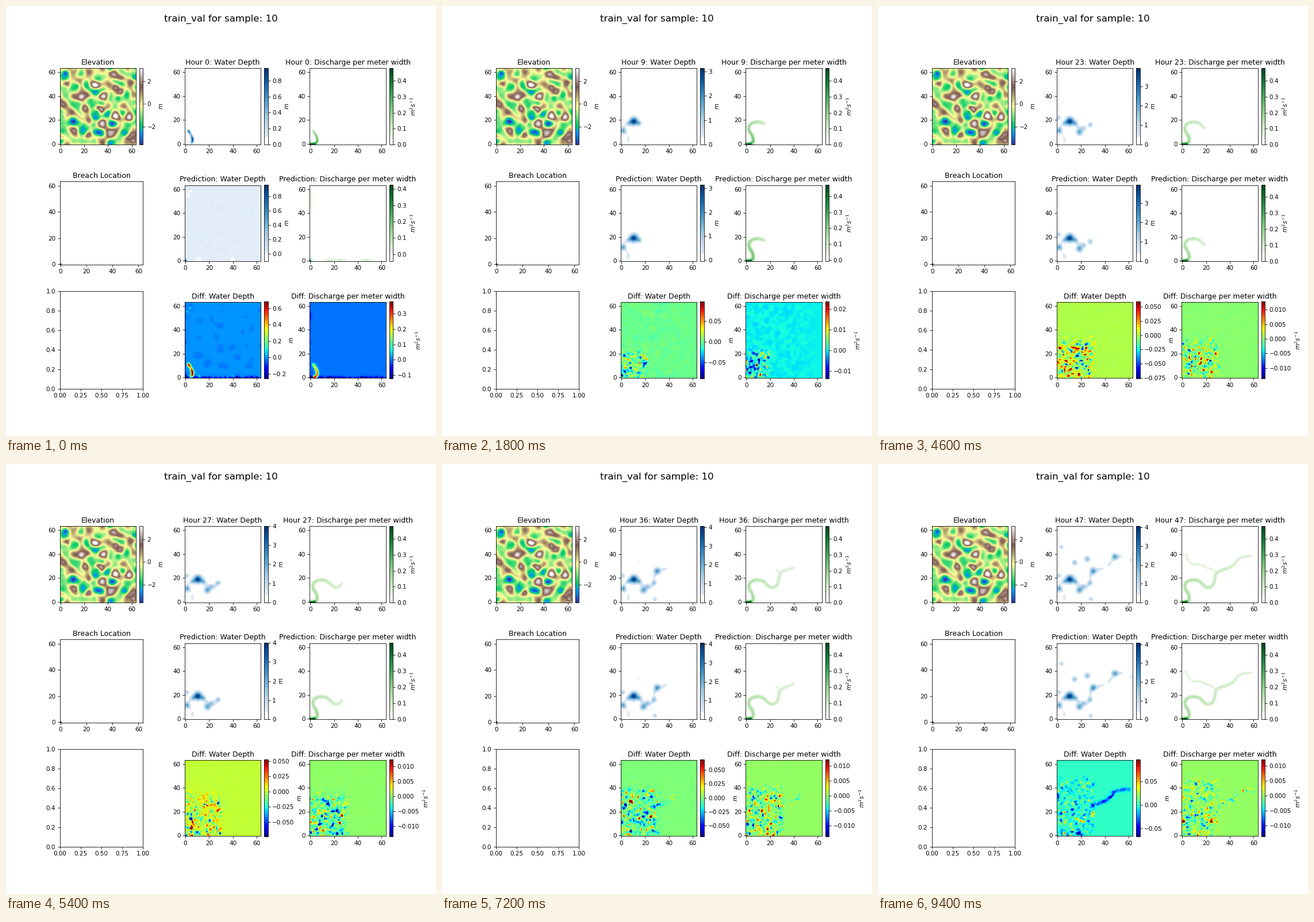
A matplotlib script that plays this animation: 748 by 748 pixels, repeating every 9600 ms.

```python
import numpy as np
import matplotlib.pyplot as plt
from matplotlib.animation import FuncAnimation
from matplotlib.colors import ListedColormap

N = 64
HOURS = 48
Y, X = np.mgrid[0:N, 0:N].astype(float)
FREQ = np.hypot(np.fft.fftfreq(N)[:, None], np.fft.fftfreq(N)[None, :])

# Hollows that fill with water: first wet hour, x, y, radius
POOLS = [
    (0, 1, 11, 2.2), (2, 10.5, 19, 3), (3, 6, 17, 1.7), (3, 15, 17.3, 1.8),
    (7, 1, 22, 1.8), (11, 18.5, 10, 2.4), (12, 22, 13, 1.8),
    (13, 27.5, 16, 1.9), (27, 28, 2.5, 1.7), (28, 30, 26, 2.4),
    (34, 14.5, 33, 2), (36, 25, 36, 2.1), (37, 48, 38, 2.3),
    (40, 3.5, 46, 1.7), (43, 62, 35, 1.8),
]
# Landmarks away from the flood: x, y, height
LANDMARKS = [(4, 59, -3.3), (53.5, 9.5, -2.7), (62, 56, -2.4), (13, 48, -2),
             (17.4, 39.5, 3.1), (46, 47, 2.1), (61, 2.5, 2.4)]

RIVER = [(0, 0), (5, .3), (6.3, 3), (5, 7.5), (1.7, 12), (3, 16.5), (8, 18.7),
         (14, 18), (18.5, 13.3), (21.5, 11.7), (25.3, 13), (27.2, 17),
         (28, 25), (38, 28), (43, 30.5), (46, 35), (50, 38), (60, 38.5)]
BRANCH = [(28, 24.5), (24, 28), (20, 28.5), (16, 31.5), (8, 31), (3, 38), (4, 44)]


def bump(x, y, sx, sy):
    return np.exp(-((X - x) / sx) ** 2 / 2 - ((Y - y) / sy) ** 2 / 2)


def ribbon(d, width):
    return np.exp(-(d / width) ** 2 / 2)


def decay(h, hours):
    return np.exp(-h / hours)


def sigmoid(v):
    return 1 / (1 + np.exp(-v))


def noise(rng, response):
    out = np.fft.ifft2(np.fft.fft2(rng.normal(size=(N, N))) * response).real
    return out / out.std()


def soft_noise(rng, sigma):
    return noise(rng, np.exp(-2 * (np.pi * sigma * FREQ) ** 2))


def trace(points):
    """Distance to a rounded path, and distance along it, for every cell."""
    p = np.array(points, float)
    for _ in range(3):
        a, b = p[:-1], p[1:]
        mid = np.stack([.75 * a + .25 * b, .25 * a + .75 * b], 1).reshape(-1, 2)
        p = np.vstack([p[:1], mid, p[-1:]])
    length = np.r_[0, np.cumsum(np.hypot(*np.diff(p, axis=0).T))]
    s = np.arange(0, length[-1], .25)
    px, py = (np.interp(s, length, p[:, i]) for i in (0, 1))
    d = np.hypot(X[..., None] - px, Y[..., None] - py)
    return d.min(-1), s[d.argmin(-1)]


river_d, river_s = trace(RIVER)
branch_d, branch_s = trace(BRANCH)


def make_elevation():
    rng = np.random.default_rng(10)
    land = 1.15 * noise(rng, np.exp(-((FREQ - .085) / .035) ** 2))
    hollows = [(x, y, -.38 * r * r) for _, x, y, r in POOLS]
    cover, hills = np.zeros((2, N, N))
    for x, y, z in hollows + LANDMARKS:
        cover = np.maximum(cover, bump(x, y, 2.8, 2.8))
        hills += z * bump(x, y, 2.3, 2.3)
    return land * (1 - cover) + hills


elevation = make_elevation()


def front(h):
    """How far the water runs; it falls back while a pool fills up."""
    return np.interp(h, [0, 16, 23, 40, 47], [18, 51, 42, 82, 94])


def reached(s, end):
    return np.clip((end - s) / 2, 0, 1)


def flow_width(h):
    return 1.2 - .45 * decay(h, 6)


def depth_max(h):
    return .957 + 3.13 * (1 - decay(h, 7.5))


def water_depth(h):
    ripple = .75 + .25 * np.cos(.65 * (river_s - 8))
    depth = .7 * ripple * ribbon(river_d, flow_width(h))
    depth *= reached(river_s, front(h)) * sigmoid((river_s - 4.5) * 1.2)
    for hour, x, y, r in POOLS:
        fill = np.clip((h - hour) / 7, 0, 1)
        depth += .42 * r * r * fill * bump(x, y, .8 * r, .8 * r)
    return depth * depth_max(h) / depth.max()


def discharge(h):
    end = front(h)
    strength = (.18 + .24 * decay(h, 12)) * (1 - .6 * np.clip(river_s / end, 0, 1))
    main = strength * reached(river_s, end) * ribbon(river_d, flow_width(h))
    source = .48 * ribbon(river_d, .7) * (river_s < 5)
    side = .08 * ribbon(branch_d, .85) * reached(branch_s, 2.6 * (h - 34))
    return np.max([main, source, side], axis=0)


def error(h, lo, hi, rng):
    """Speckle over the flooded corner and along the river."""
    span = (hi - lo) / 2
    box = sigmoid((min(30, 9 + 1.25 * h) - X) / 1.2) * sigmoid((14 + .7 * h - Y) / 2)
    trail = ribbon(river_d, 1.4) * (river_s < front(h) + 6)
    mask = np.clip(box * (1 - .5 * (h / HOURS) ** 4) + .6 * trail, 0, 1)
    n = soft_noise(rng, .6)
    speckle = .2 * n * np.abs(n) + rng.normal(0, .07)
    haze = .05 * decay(h, 12) * soft_noise(rng, 1.2) * sigmoid((52 - X) / 5)
    return span * (mask * speckle + haze)


def river_bias(h):
    late = np.clip((h - 34) / 13, 0, 1)
    lower = (river_s > 58) & (river_s < front(h))
    return .03 * late * ribbon(river_d, 1) * lower


def first_guess(rng):
    """The flat prediction at hour 0."""
    wd = .003 + .022 * (elevation < -1.5)
    for x, y in [(4, 58), (2, 55), (11, 1), (40, 1)]:
        wd -= .1 * bump(x, y, 1, .7)
    wd += .93 * bump(0, 0, .8, .8)
    q = .42 * bump(0, 0, .7, .7)
    for x in (17, 25, 47):
        q += .06 * bump(x, 0, 2, .7)
    q += .05 * bump(0, 51, .6, 3)
    edge = np.exp(-Y / .8) + .3 * np.exp(-X / .8)
    strip = np.abs(soft_noise(rng, 1.2)) * edge
    return wd, q, wd + .14 * strip, q + .06 * strip


def fields(h):
    rng = np.random.default_rng(100 + h)
    wd, q = water_depth(h), discharge(h)
    if h == 0:
        wd_range, q_range = (-.255, .679), (-.12, .376)
        wd_pred, q_pred, wd_off, q_off = first_guess(rng)
        wd_err, q_err = wd - wd_off, q * (river_s > 2) - q_off
    else:
        swing = np.cos(2 * np.pi * (h - 9) / 38)
        wd_range = -.06 - .04 * decay(h, 25), .074 + .022 * swing
        q_range = -.0135, .012 + .07 * decay(h, 5)
        wd_err = error(h, *wd_range, rng) - river_bias(h)
        q_err = error(h, *q_range, rng)
        wd_pred, q_pred = wd - wd_err, q - q_err
    top = depth_max(h)
    return [
        (wd, 0, top),
        (q, 0, .482),
        (wd_pred, -.106 * decay(h, 14), top),
        (q_pred, -.045 * decay(h, 6), .475 - .05 * decay(h, 3)),
        (wd_err, *wd_range),
        (q_err, *q_range),
    ]


def white_based(name):
    colors = plt.get_cmap(name)(np.linspace(0, 1, 256))
    colors[:25] = 1
    return ListedColormap(colors)


def panel(ax, data, lo, hi, cmap, title, unit):
    im = ax.imshow(data, origin="lower", cmap=cmap, vmin=lo, vmax=hi)
    ax.set_title(title)
    fig.colorbar(im, ax=ax, fraction=.046, pad=.04).set_label(unit)
    return im


fig, axes = plt.subplots(3, 3, figsize=(10, 10), dpi=74.8)
fig.subplots_adjust(left=.125, right=.9, bottom=.11, top=.88, wspace=.5, hspace=.2)
fig.suptitle("train_val for sample: 10", fontsize=16)

panel(axes[0, 0], elevation, -3.56, 3.15, "terrain", "Elevation", "$m$")
breach = np.zeros((N, N))
breach[0, 0] = 1
axes[1, 0].imshow(breach, origin="lower", cmap="binary")
axes[1, 0].set_title("Breach Location")

QUANTITIES = ["Water Depth", "Discharge per meter width"]
UNITS = ["$m$", "$m^2s^{-1}$"]
water_maps = white_based("Blues"), white_based("Greens")
ROWS = [("Hour 0", water_maps), ("Prediction", water_maps), ("Diff", ("jet", "jet"))]
images = []
start = iter(fields(0))
for row, (prefix, cmaps) in zip(axes, ROWS):
    for ax, cmap, quantity, unit in zip(row[1:], cmaps, QUANTITIES, UNITS):
        images.append(panel(ax, *next(start), cmap, f"{prefix}: {quantity}", unit))


def update(h):
    for im, (data, lo, hi) in zip(images, fields(h)):
        im.set_data(data)
        im.set_clim(lo, hi)
    for ax, quantity in zip(axes[0, 1:], QUANTITIES):
        ax.set_title(f"Hour {h}: {quantity}")
    return images


anim = FuncAnimation(fig, update, frames=HOURS, interval=200, repeat=True)
plt.show()
```
